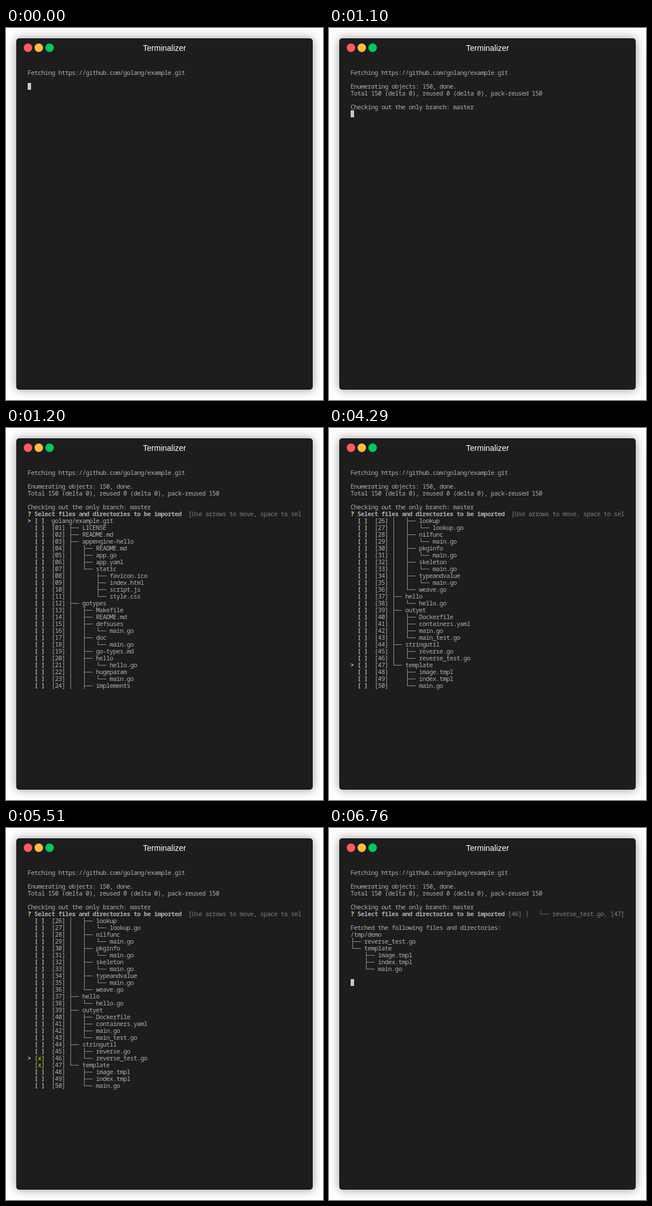
These frames come from a looping animation (556 by 650 pixels, 7310 ms). An HTML page with a canvas:

```html
<!DOCTYPE html>
<html lang="en">
<head>
<meta charset="utf-8">
<title>Terminal</title>
<style>
  html, body { margin: 0; width: 100%; height: 100%; overflow: hidden; background: #fff; }
  .window {
    position: absolute; left: 18px; top: 18px; width: 520px; height: 614px;
    border-radius: 5px; background: #1d1d1d; box-shadow: 0 0 18px rgba(0, 0, 0, .4);
  }
  .title {
    position: absolute; left: 0; right: 0; top: 9px; text-align: center; color: #fff;
    font: 14px/16px "Liberation Sans", Arial, sans-serif;
  }
  i { position: absolute; top: 9px; width: 15px; height: 15px; border-radius: 50%; }
  canvas { position: absolute; left: 0; top: 0; }
</style>
</head>
<body>
<div class="window">
  <i style="left:13px;background:#ff5a5a"></i>
  <i style="left:32px;background:#ffbc45"></i>
  <i style="left:51px;background:#00ca56"></i>
  <div class="title">Terminalizer</div>
</div>
<canvas width="556" height="650"></canvas>
<script>
const ctx = document.querySelector('canvas').getContext('2d');
const LOOP = 7310, LEFT = 38, TOP = 72, CELL = 6, LINE = 12;
const FG = '#afafaf', DIM = '#708387', YELLOW = '#ead76c', GREEN = '#b3e33b', CURSOR = '#c7c7c7';

const firstPage = `├── LICENSE
├── README.md
├── appengine-hello
│   ├── README.md
│   ├── app.go
│   ├── app.yaml
│   └── static
│       ├── favicon.ico
│       ├── index.html
│       ├── script.js
│       └── style.css
├── gotypes
│   ├── Makefile
│   ├── README.md
│   ├── defsuses
│   │   └── main.go
│   ├── doc
│   │   └── main.go
│   ├── go-types.md
│   ├── hello
│   │   └── hello.go
│   ├── hugeparam
│   │   └── main.go
│   ├── implements`.split('\n');

const lastPage = `│   ├── lookup
│   │   └── lookup.go
│   ├── nilfunc
│   │   └── main.go
│   ├── pkginfo
│   │   └── main.go
│   ├── skeleton
│   │   └── main.go
│   ├── typeandvalue
│   │   └── main.go
│   └── weave.go
├── hello
│   └── hello.go
├── outyet
│   ├── Dockerfile
│   ├── containers.yaml
│   ├── main.go
│   └── main_test.go
├── stringutil
│   ├── reverse.go
│   └── reverse_test.go
└── template
    ├── image.tmpl
    ├── index.tmpl
    └── main.go`.split('\n');

const fetched = `Fetched the following files and directories:
/tmp/demo
├── reverse_test.go
└── template
    ├── image.tmpl
    ├── index.tmpl
    └── main.go`.split('\n');

const number = (lines, from) =>
  lines.map((s, i) => `[${String(from + i).padStart(2, '0')}] ${s}`);
const topList = ['golang/example.git', ...number(firstPage, 1)];
const endList = number(lastPage, 26);

function boxChar(ch, x, y, color) {
  ctx.globalAlpha = .8;
  ctx.fillStyle = color;
  if (ch === '─') ctx.fillRect(x, y + 6, CELL, 1);
  else ctx.fillRect(x + 3, y, 1, ch === '└' ? 7 : LINE);
  if (ch === '├' || ch === '└') ctx.fillRect(x + 4, y + 6, 2, 1);
  ctx.globalAlpha = 1;
}

function write(row, col, str, color = FG, bold = false) {
  const y = TOP + row * LINE;
  ctx.font = `${bold ? 'bold ' : ''}11px "Noto Sans Mono", monospace`;
  [...str].forEach((ch, i) => {
    const x = LEFT + (col + i) * CELL;
    if ('│├└─'.includes(ch)) return boxChar(ch, x, y, color);
    ctx.fillStyle = color;
    ctx.fillText(ch, x + CELL / 2, y + 10);
  });
}

function cursor(row) {
  ctx.fillStyle = CURSOR;
  ctx.fillRect(LEFT, TOP + row * LINE, CELL, LINE);
}

function list(items, focus, marked) {
  items.forEach((item, i) => {
    const row = 7 + i, on = marked.includes(i);
    if (i === focus) write(row, 0, '>', '#c4c4c4', true);
    write(row, 2, on ? '[x]' : '[ ]', on ? GREEN : FG, !on);
    write(row, 7, item);
  });
}

function draw(t) {
  ctx.clearRect(0, 0, 556, 650);
  ctx.textAlign = 'center';
  write(0, 0, 'Fetching https://github.com/golang/example.git');
  if (t < 900) return cursor(2);
  write(2, 0, 'Enumerating objects: 150, done.');
  if (t < 1070) return cursor(3);
  write(3, 0, 'Total 150 (delta 0), reused 0 (delta 0), pack-reused 150');
  if (t < 1100) return cursor(4);
  write(5, 0, 'Checking out the only branch: master');
  if (t < 1200) return cursor(6);

  write(6, 0, '?', YELLOW, true);
  write(6, 2, 'Select files and directories to be imported', FG, true);
  if (t < 6740) {
    write(6, 47, '[Use arrows to move, space to sel', DIM);
    if (t < 3200) return list(topList, 0, []);
    const ups = [3740, 4080, 4290, 4990].filter(at => t >= at).length;
    const marked = [[4580, 21], [5510, 20]].filter(([at]) => t >= at).map(([, i]) => i);
    return list(endList, 24 - ups, marked);
  }
  write(6, 46, '[46] │   └── reverse_test.go, [47]', DIM);
  if (t < 6760) return cursor(7);
  fetched.forEach((s, i) => write(8 + i, 0, s));
  cursor(16);
}

const start = performance.now();
function tick() {
  draw((performance.now() - start) % LOOP);
  requestAnimationFrame(tick);
}
tick();
</script>
</body>
</html>
```
